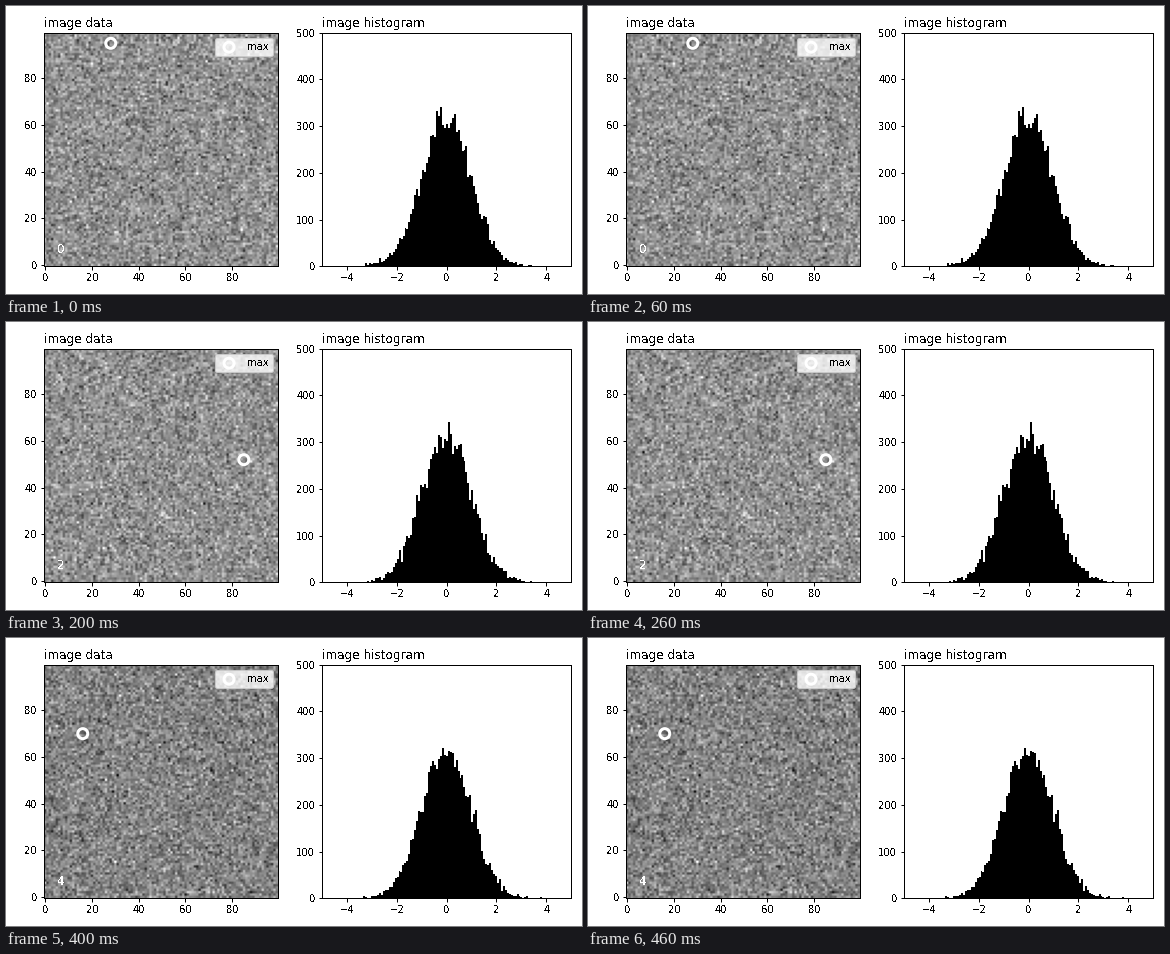
Write a matplotlib script that moves like this. It is 576 by 288 pixels and loops after 0.5 s.

```python
import numpy as np
import matplotlib.pyplot as plt
from matplotlib.animation import ArtistAnimation

SIZE = 100
FRAME_MS = 100
SPREAD = 7.9  # distance from the darkest to the brightest value
MARKS = [(28, 95), (58, 43), (85, 52), (33, 20), (16, 70)]

# crisp text and solid one-pixel lines
plt.rcParams.update({
    "font.family": "DejaVu Sans",
    "font.size": 10,
    "text.antialiased": False,
    "axes.linewidth": 1,
    "xtick.major.width": 1,
    "ytick.major.width": 1,
})
rng = np.random.RandomState(7)


def value_range(i):
    """Limits of the grey scale, drifting once per loop."""
    phase = 2 * np.pi * (i - 1) / len(MARKS)
    middle = -0.4 - 0.35 * np.cos(phase)
    return middle - SPREAD / 2, middle + SPREAD / 2


fig, (left, right) = plt.subplots(1, 2, figsize=(8, 4), dpi=72)
left.set_title("image data", loc="left", fontsize=12)
right.set_title("image histogram", loc="left", fontsize=12)

frames = []
for i, (x, y) in enumerate(MARKS):
    data = rng.randn(SIZE, SIZE)
    low, high = value_range(i)
    image = left.imshow(data, cmap="gray", origin="lower", vmin=low, vmax=high)
    ring = left.scatter(x, y, s=100, facecolors="none",
                        edgecolors="white", linewidths=3, label="max")
    number = left.text(5, 5, str(i), color="white", fontsize=12)
    bars = right.hist(data.ravel(), bins=100, range=(low, high),
                      color="black")[2]
    frames.append([image, ring, number, *bars])

left.set(xlim=(-0.5, SIZE - 0.5), ylim=(-0.5, SIZE - 0.5))
left.legend(handles=[ring], loc="upper right")
right.set(xlim=(-5, 5), ylim=(0, 500))
fig.tight_layout()

anim = ArtistAnimation(fig, frames, interval=FRAME_MS, repeat=True)
plt.show()
```
